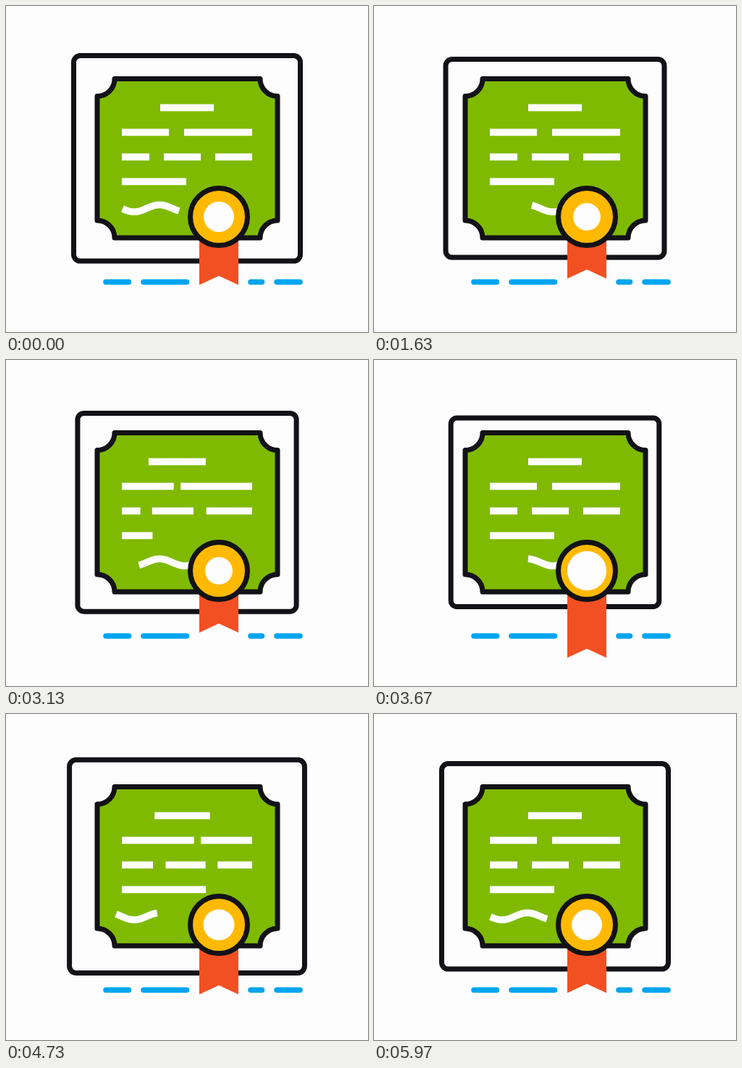
Animation of 500x450 px, one loop 6.01 s. Source, as an HTML page:

```html
<!DOCTYPE html>
<html lang="en">
<head>
<meta charset="utf-8">
<title>Certificate</title>
<style>
  html, body { margin: 0; width: 100%; height: 100%; overflow: hidden; background: #fdfdfd; }
  svg { display: block; width: 500px; height: 450px; }
  .ink { stroke: #121217; stroke-width: 7; stroke-linejoin: round; }
  .bar { stroke: #fdfdfd; stroke-width: 9.6; fill: none; }
  .ground { stroke: #00a4ef; stroke-width: 7.6; stroke-linecap: round; }
</style>
</head>
<body>
<svg viewBox="0 0 500 450">
  <path class="ground" d="M138 381H169.500M190 381H249.500M338 381H353.500M374 381H406"/>
  <rect id="frame" class="ink" fill="#fdfdfd"/>
  <path class="ink" fill="#7fba00"
    d="M150 100.500H351A24 24 0 0 0 375 124.500V296A24 24 0 0 0 351 320H150A24 24 0 0 0 126 296V124.500A24 24 0 0 0 150 100.500Z"/>
  <path id="text" class="bar"/>
  <path id="wave" class="bar"/>
  <path id="ribbon" fill="#f25022"/>
  <circle class="ink" cx="294" cy="291" r="39.500" fill="#ffb900"/>
  <circle id="core" cx="294" cy="291" fill="#fdfdfd"/>
</svg>
<script>
  const LOOP = 6010;
  const el = id => document.getElementById(id);
  const frame = el('frame'), text = el('text'), wave = el('wave'),
        ribbon = el('ribbon'), core = el('core');

  // Turning points as [time, value], eased from one to the next
  const growth = [[0, 0], [1200, -12.5], [2300, 8], [3700, -13], [4900, 7], [LOOP, 0]];
  const drift = [[0, 161], [1150, 225], [3000, 181], [3700, 213], [4800, 130], [LOOP, 161]];
  const drop = [[0, 385], [120, 376], [230, 387], [790, 414], [1300, 385], [1500, 385]];
  const swing = [[0, 0], [150, 0], [600, 1], [960, -1], [1500, 0], [2000, 0]];

  // Bar edges: a fixed x, or [rest, shift at swing 1, shift at swing -1]
  const rows = [
    { lag: -80, edges: [[213, 37, -29], [287, 19, -20]] },
    { lag: 100, edges: [160, [225, 36, 7], [246, 24, -5], 340] },
    { lag: 0, edges: [160, [198, 12, -16], [218, 6, -21], [269, 16, -13], [289, 8, -16], 340] },
    { lag: 80, edges: [160, [249, 30, -50]] }
  ];

  const ease = u => (1 - Math.cos(Math.PI * u)) / 2;

  function track(keys, time) {
    const period = keys[keys.length - 1][0];
    const t = (time + period) % period;
    const i = keys.findIndex(k => k[0] > t);
    const [t0, a] = keys[i - 1], [t1, b] = keys[i];
    return a + (b - a) * ease((t - t0) / (t1 - t0));
  }

  const set = (node, attrs) => {
    for (const k in attrs) node.setAttribute(k, attrs[k]);
  };

  function rowPath({ lag, edges }, i, t) {
    const s = track(swing, t - lag), y = 140.4 + 34 * i;
    return edges.map((edge, n) => {
      const [rest, right = 0, left = 0] = [edge].flat();
      const x = rest + (s > 0 ? s * right : -s * left);
      return n % 2 ? `H${x}` : `M${x} ${y}`;
    }).join('');
  }

  function wavePath(a, b) {
    const steps = 40, pts = [];
    for (let i = 0; i <= steps; i++) {
      const x = a + (b - a) * i / steps;
      const y = 279.3 + 4.8 * Math.cos(2 * Math.PI * (x - 177) / 70);
      pts.push(x.toFixed(2) + ' ' + y.toFixed(2));
    }
    return 'M' + pts.join('L');
  }

  function draw(t) {
    const s = 1 + track(growth, t) / 160;
    const w = 313 * s, h = 283.5 * s;
    set(frame, { x: 250 - w / 2, y: 210.3 - h / 2, width: w, height: h, rx: 9 * s });

    set(text, { d: rows.map((row, i) => rowPath(row, i, t)).join('') });

    // The stroke has a fixed left end, so it shortens when it drifts past it
    const from = track(drift, t);
    set(wave, { d: wavePath(Math.max(152, from), from + 78) });

    const tip = track(drop, t);
    set(ribbon, { d: `M267 300H321V${tip}L294 ${tip - 12.5}L267 ${tip}Z` });
    set(core, { r: 21 + (tip - 385) * 0.235 });
  }

  const start = performance.now();
  function tick() {
    draw((performance.now() - start) % LOOP);
    requestAnimationFrame(tick);
  }
  tick();
</script>
</body>
</html>
```
